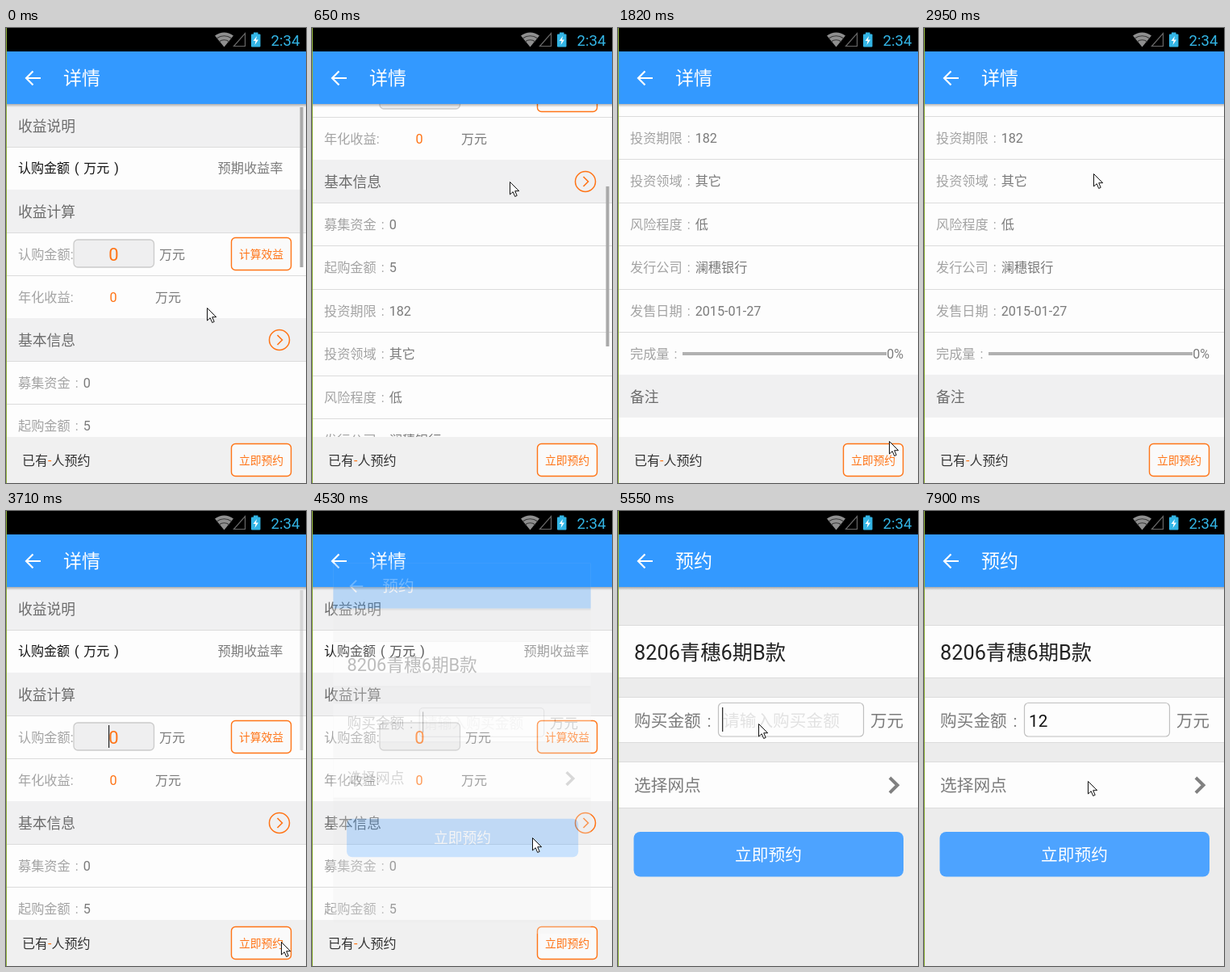
Recreate the animation shown at these times as an HTML page. Size 372x563 px, loop 8 s.

```html
<!DOCTYPE html>
<html lang="zh-CN">
<head>
<meta charset="utf-8">
<style>
  html, body { margin: 0; width: 100%; height: 100%; overflow: hidden; background: #ececec; }
  svg { display: block; width: 372px; height: 563px; font-family: Roboto, "Noto Sans CJK SC", "Noto Sans CJK", sans-serif; }
</style>
</head>
<body>
<svg id="stage" viewBox="0 0 372 563" xmlns="http://www.w3.org/2000/svg"></svg>
<script>
const LOOP = 8000;
const ORANGE = '#ff7416', BLUE = '#3399ff', CYAN = '#33b5e5';
const MUTED = '#a3a3a3', GRAY = '#7b7b7b', HEADING = '#6c6c6c';

// Full-width punctuation is drawn as a narrow glyph centred in its cell.
const NARROW = { '：': ':', '（': '(', '）': ')' };
const spaced = str => str.split(/([：（）])/)
  .map((s, i) => (i && s ? `<tspan dx=".37em">${NARROW[s] || s}</tspan>` : s)).join('');

// Text is placed by its vertical centre.
const text = (x, cy, size, fill, str, anchor = 'start') =>
  `<text x="${x}" y="${cy + size * 0.37}" font-size="${size}" fill="${fill}" text-anchor="${anchor}">${spaced(str)}</text>`;
const tint = (fill, str) => `<tspan fill="${fill}">${str}</tspan>`;
const box = (x, y, w, h, fill, extra = '') =>
  `<rect x="${x}" y="${y}" width="${w}" height="${h}" fill="${fill}" ${extra}/>`;
const line = y => box(0, y, 372, 1, '#dcdcdc');
const stroke = (d, color, width) =>
  `<path d="${d}" fill="none" stroke="${color}" stroke-width="${width}"/>`;

const smallButton = (y, label) =>
  box(279.5, y, 74, 40, '#fafafa', `rx="5" stroke="${ORANGE}" stroke-width="1.4"`) +
  text(316.5, y + 20.5, 13.8, ORANGE, label, 'middle');

const toolbar = title =>
  box(0, 94, 372, 4, 'url(#shade)') +
  box(0, 29, 372, 65, BLUE) +
  stroke('M43 62H25M33.5 53.5L25 62L33.5 70.5', '#fff', 2.2) +
  text(71, 61, 23, '#fff', title);

// Fact rows, from the seventh on, are slightly taller than the others.
const rowTop = i => Math.round(94 + 53 * i + 0.43 * Math.max(0, i - 6));
const rowMid = i => rowTop(i) + 27;

function listRows() {
  const headings = { 0: '收益说明', 2: '收益计算', 5: '基本信息', 14: '备注' };
  const facts = { 募集资金: '0', 起购金额: '5', 投资期限: '182', 投资领域: '其它',
    风险程度: '低', 发行公司: '澜穗银行', 发售日期: '2015-01-27' };
  let out = box(0, 90, 372, 850, '#fdfdfd');
  for (let i = 1; i < 15; i++) out += line(rowTop(i));
  for (const [i, label] of Object.entries(headings))
    out += box(0, rowTop(+i), 372, 53, '#f0f0f1') + text(15, rowMid(+i), 17.8, HEADING, label);
  Object.entries(facts).forEach(([label, value], i) => {
    out += text(15, rowMid(i + 6), 16.2, MUTED, `${label}：` + tint(GRAY, value));
  });
  const done = rowMid(13);
  return out +
    text(15, 173.5, 16, '#111', '认购金额（万元）') +
    text(343.5, 173.5, 16.2, GRAY, '预期收益率', 'end') +
    text(15, 280, 16.2, MUTED, '认购金额:') +
    box(84, 262, 99.5, 34, '#efeff0', 'rx="5" stroke="#cbcbcb" stroke-width="1.3"') +
    text(133.5, 280, 22, ORANGE, '0', 'middle') +
    text(190, 280, 16, GRAY, '万元') +
    smallButton(259.5, '计算效益') +
    text(15, 333, 16.2, MUTED, '年化收益:') +
    text(133, 333.5, 16.2, ORANGE, '0', 'middle') +
    text(185, 333, 16, GRAY, '万元') +
    `<circle cx="339" cy="386" r="12.5" fill="none" stroke="${ORANGE}" stroke-width="1.5"/>` +
    stroke('M336.5 380L342.5 386L336.5 392', ORANGE, 1.6) +
    text(15, done, 16.2, MUTED, '完成量：') +
    box(80, done - 2, 253, 4, '#b1b1b1') +
    text(354, done, 16, GRAY, '0%', 'end');
}

const detailScreen = `
  <g id="list">${listRows()}${box(127, 265, 1.2, 28, '#222', 'id="amountCaret"')}</g>
  ${box(364.5, 98, 4, 198, '#a9a9a9', 'id="thumb"')}
  ${box(0, 506, 372, 57, '#f0f0f0')}
  ${text(20, 535, 16, '#333', '已有' + tint(ORANGE, '-') + '人预约')}
  ${smallButton(514.5, '立即预约')}
  ${toolbar('详情')}`;

const card = (y, h) => box(0, y, 372, h, '#fdfdfd') + line(y - 1) + line(y + h);

const bookingScreen = `
  ${box(0, 29, 372, 534, '#ececec')}
  ${card(142, 64)}${text(20, 174.5, 25.3, '#222', '8206青穗6期B款')}
  ${card(231, 55)}${text(20, 259, 20.7, GRAY, '购买金额：')}
  ${box(124.5, 237.5, 180, 41.5, '#fdfdfd', 'rx="5" stroke="#c0c0c0" stroke-width="1.2"')}
  <g id="hint">${text(130, 259, 20.7, '#e2e2e2', '请输入购买金额')}</g>
  <text id="typed" x="130" y="266.5" font-size="20.7" fill="#111"></text>
  ${box(129, 243, 1.3, 30, '#333', 'id="caret"')}
  ${text(313, 259, 20.5, GRAY, '万元')}
  ${card(311, 56)}${text(20, 339, 20.7, GRAY, '选择网点')}
  ${stroke('M337 330L346.5 339.3L337 348.6', '#808080', 4)}
  ${box(19.5, 397, 334.5, 55.5, '#4da3ff', 'rx="8"')}
  ${text(186.5, 425, 20.7, '#fff', '立即预约', 'middle')}
  ${toolbar('预约')}`;

const statusBar = `
  ${box(0, 0, 372, 29, '#000')}
  <path d="M259 9.5Q270.5 1.5 282 9.5L270.5 23.5Z" fill="#8f8f8f"/>
  ${stroke('M261 13Q270.5 6.5 280 13M264 17Q270.5 12.5 277 17', '#3a3a3a', 1.1)}
  ${stroke('M282.5 22.5L296.5 6.5V22.5Z', '#686868', 1.2)}
  ${box(304, 7.5, 11.5, 16, CYAN, 'rx="1"')}${box(307, 5.5, 5.5, 2.5, CYAN)}
  <path d="M311 10L306.5 16H309.5L308.5 21L313 14.5H310Z" fill="#fff"/>
  ${text(328.5, 15.5, 18.6, CYAN, '2:34')}`;

const stage = document.getElementById('stage');
stage.innerHTML = `
  <defs><linearGradient id="shade" x2="0" y2="1">
    <stop stop-color="#000" stop-opacity=".28"/><stop offset="1" stop-color="#000" stop-opacity="0"/>
  </linearGradient></defs>
  <g>${detailScreen}</g>
  <g id="booking">${bookingScreen}</g>
  ${statusBar}
  ${box(0, 0, 1, 563, '#8fb03c')}
  <path id="pointer" d="M.5 .5V16L4.2 12.7L6.7 18.5L9.2 17.4L6.7 11.7H11.7Z"
    fill="#fff" stroke="#111" stroke-width="1"/>`;
const set = (id, name, value) => document.getElementById(id).setAttribute(name, value);
const show = (id, on) => set(id, 'visibility', on ? 'visible' : 'hidden');

const ramp = (t, from, to) => Math.min(1, Math.max(0, (t - from) / (to - from)));
const smooth = p => p * p * (3 - 2 * p);
const decelerate = p => 1 - (1 - p) ** 5;

const STEP = 129, LEAD = 35;
const hold = time => Math.floor((time + LEAD) / STEP) * STEP;

// Each gesture carries the pointer to a new place and rests there until the next one.
const pointerStart = { x: 249, y: 346 };
const gestures = [
  { from: 0, to: 120, x: 258, y: 364 },
  { from: 120, to: 650, x: 245, y: 190 },
  { from: 650, to: 1160, x: 245, y: 375 },
  { from: 1160, to: 1550, x: 250, y: 284 },
  { from: 1550, to: 1820, x: 337, y: 513 },
  { from: 1820, to: 2250, x: 328, y: 535 },
  { from: 2600, to: 2960, x: 210, y: 180 },
  { from: 2960, to: 3700, x: 341, y: 533 },
  { from: 4200, to: 4510, x: 273, y: 404 },
  { from: 4510, to: 5400, x: 174, y: 263 },
  { from: 7300, to: 7600, x: 203, y: 334 },
];
function pointerAt(t) {
  let { x, y } = pointerStart;
  for (const g of gestures) {
    const p = smooth(ramp(t, g.from, g.to));
    x += (g.x - x) * p;
    y += (g.y - y) * p;
  }
  return `translate(${Math.round(x)} ${Math.round(y)})`;
}

function render(time) {
  const t = hold(time);
  set('pointer', 'transform', pointerAt(t));

  const scroll = 354 * smooth(ramp(t, 120, 1100)) + 56 * smooth(ramp(t, 1160, 1550))
    - 410 * smooth(ramp(t, 2970, 3620));
  set('list', 'transform', `translate(0 ${-Math.round(scroll)})`);
  set('thumb', 'y', 98 + scroll * 0.5);
  set('thumb', 'opacity', 1 - ramp(t, 1550, 1800) + ramp(t, 2970, 3070) - ramp(t, 3600, 3830));
  show('amountCaret', t > 3580 && t < 3980);

  const open = decelerate(ramp(t, 4495, 4795));
  set('booking', 'opacity', open);
  set('booking', 'transform', `translate(186 281.5) scale(${0.8 + 0.2 * open}) translate(-186 -281.5)`);

  const typed = '12'.slice(0, t < 6850 ? 0 : t < 7180 ? 1 : 2);
  document.getElementById('typed').textContent = typed;
  show('hint', !typed);
  // The caret blinks every half second and stays lit while typing.
  const blinkOn = Math.floor((t - 4500) / 500) % 2 === 0;
  show('caret', t < 7700 && (blinkOn || typed));
  set('caret', 'x', 129 + typed.length * 11.4);
}

const start = performance.now();
function loop() {
  render((performance.now() - start) % LOOP);
  requestAnimationFrame(loop);
}
loop();
</script>
</body>
</html>
```
